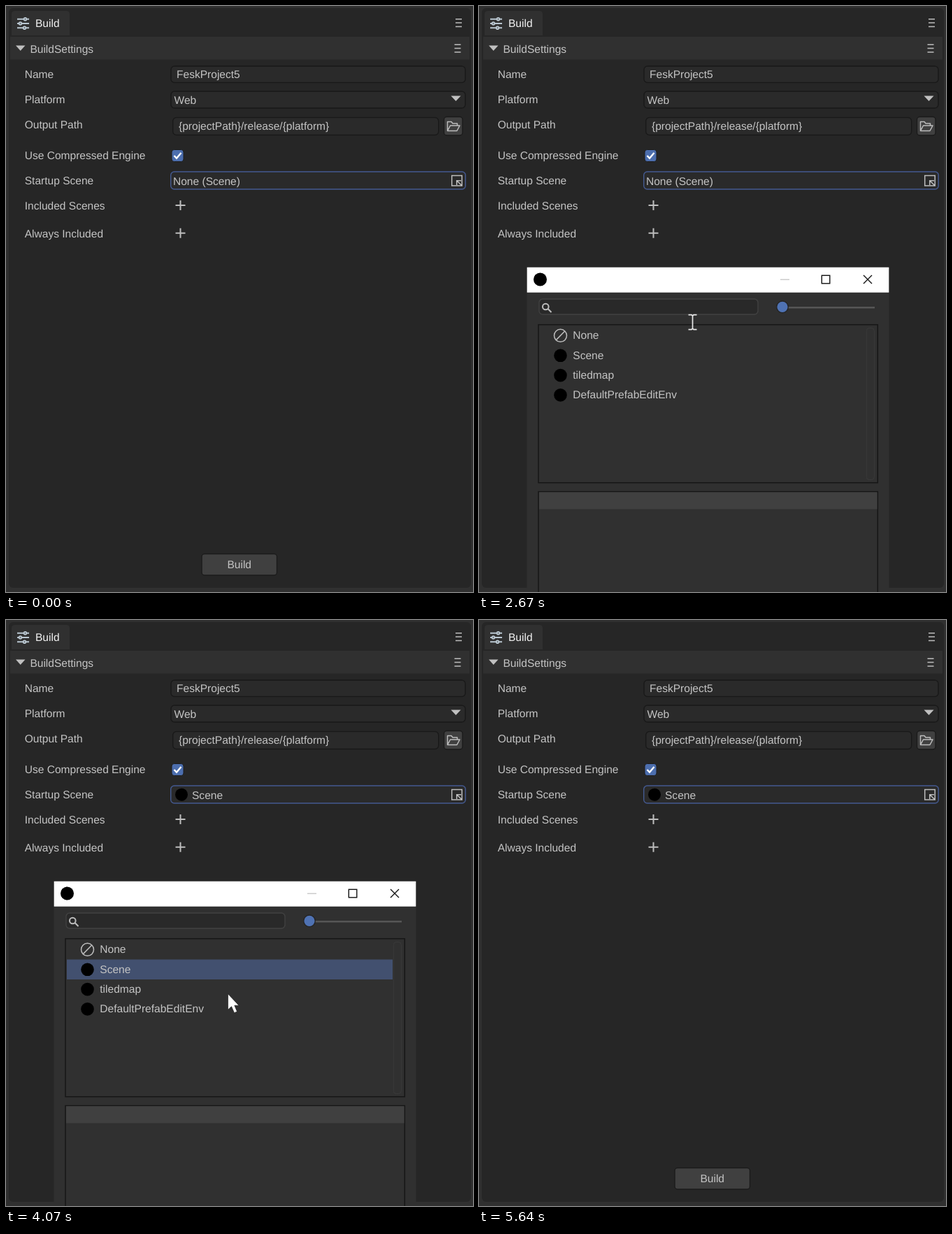
These frames come from a looping animation (668 by 838 pixels, 6520 ms). An HTML page:

```html
<!DOCTYPE html>
<html lang="en">
<head>
<meta charset="utf-8">
<title>Build settings</title>
<style>
  html, body { margin: 0; width: 100%; height: 100%; overflow: hidden; background: #303030; }
  svg { display: block; width: 668px; height: 838px; }
  text { font: 15.55px "Liberation Sans", Arial, sans-serif; fill: #c4c4c4; text-rendering: geometricPrecision; white-space: pre; }
  .field { fill: #2a2a2a; stroke: #191919; stroke-width: 1.4; }
  .focus { stroke: #445a91; }
  .search { fill: #292929; stroke: #414141; }
  .button { fill: #404040; stroke: #1b1b1b; stroke-width: 1.4; }
  .pane { fill: #303030; stroke: #161616; stroke-width: 1.5; }
  .line { fill: none; stroke: #bdbdbd; stroke-width: 1.5; }
  .bold { stroke-width: 2; }
  .solid { fill: #c0c0c0; }
  .bright { fill: #f2f2f2; }
</style>
</head>
<body>
<svg viewBox="0 0 668 838">
  <defs>
    <path id="menu" class="line" d="M0 0H9M0 5.4H9M0 10.8H9"/>
    <path id="plus" class="line bold" d="M-7 0H7M0 -7V7"/>
  </defs>
  <rect width="668" height="838" fill="#303030"/>
  <rect x="4" y="3" width="661" height="829" rx="6" fill="#262626"/>
  <path d="M8 42V12q0-5 5-5H86q5 0 5 5V42Z" fill="#303030"/>
  <rect x="6" y="44" width="657" height="32.5" fill="#303030"/>

  <g class="line bold" style="stroke:#b9c6d0">
    <path d="M16 18.7H33M16 25H33M16 31.2H33"/>
    <g fill="#303030"><circle cx="27.5" cy="18.7" r="1.8"/><circle cx="20.5" cy="25" r="1.8"/><circle cx="26.5" cy="31.2" r="1.8"/></g>
  </g>
  <text x="42" y="29.5" class="bright">Build</text>
  <use href="#menu" x="643" y="18.7"/>
  <use href="#menu" x="641.5" y="55.2"/>
  <path class="solid" d="M14 56.5H27.5L20.7 64Z"/>
  <text x="34.4" y="67">BuildSettings</text>
  <g id="labels"></g>

  <rect class="field" x="236" y="86" width="421" height="23.5" rx="5"/>
  <text x="244" y="103">FeskProject5</text>
  <rect class="field" x="236" y="122" width="421" height="24" rx="5"/>
  <text x="240.5" y="139.5">Web</text>
  <path class="solid" d="M636.5 128.5H650.5L643.5 136Z"/>
  <rect class="field" x="238.7" y="159.5" width="380" height="25" rx="5"/>
  <text x="247" y="177">{projectPath}/release/{platform}</text>
  <rect class="button" x="626.5" y="158.5" width="26.5" height="26.5" rx="4"/>
  <path class="line" stroke-linejoin="round" d="M631.5 178.5V165.5H637L639 168H645.5V171M631.5 178.5L635.5 171H649L645 178.5Z"/>
  <rect x="237" y="205.5" width="17" height="17" rx="3.5" fill="#4c6eae" stroke="#1d1d1d"/>
  <path d="M240.5 214L244 217.7L250.5 210" fill="none" stroke="#fff" stroke-width="2.4"/>

  <rect class="field focus" x="235.7" y="237" width="421.6" height="25" rx="5"/>
  <text id="empty" x="239" y="255.5">None (Scene)</text>
  <g id="chosen"><circle cx="251" cy="249.7" r="9" fill="#000"/><text x="266" y="255.5">Scene</text></g>
  <path class="line" d="M637.7 242.5H652.2V257H637.7ZM652.2 257L645 250M644.7 256V249.8H651"/>
  <use href="#plus" x="249.5" y="285"/>
  <use href="#plus" x="249.5" y="324.8"/>
  <rect class="button" x="280" y="783.5" width="107.5" height="30.5" rx="4"/>
  <text x="333.7" y="804" text-anchor="middle">Build</text>

  <g id="dialog">
    <rect id="frame" x="68.5" y="373.5" width="518" height="480" fill="#303030"/>
    <rect x="68.7" y="373.7" width="517.6" height="36" fill="#fff"/>
    <circle cx="87.5" cy="391" r="9.5" fill="#000"/>
    <g id="controls" fill="none" stroke="#111" stroke-width="1.4">
      <path d="M431 391.2H444" stroke="#c8c8c8"/>
      <rect x="490.3" y="385.3" width="11.5" height="11.5"/>
      <path d="M550 385L562 397M562 385L550 397"/>
    </g>
    <rect class="field search" x="86" y="419" width="313" height="22" rx="5"/>
    <circle class="line bold" cx="95.3" cy="430" r="4.3"/>
    <path class="line bold" d="M98.8 433.3L103.5 438"/>
    <path d="M434 431.3H566" stroke="#565656" stroke-width="2.4"/>
    <circle cx="434" cy="430.3" r="8.3" fill="#4f72b3" stroke="#252525" stroke-width="1.4"/>
    <rect class="pane" x="85" y="455.7" width="485.3" height="226"/>
    <rect x="554.3" y="460.5" width="11" height="217" rx="4" fill="none" stroke="#3a3a3a"/>
    <rect id="selected" x="87" y="485.5" width="466" height="28.5" fill="#42506f"/>
    <circle class="line" cx="116.5" cy="471.3" r="9"/>
    <path class="line" d="M110.3 477.6L122.7 465"/>
    <g id="scenes"></g>
    <rect class="pane" x="85" y="694.5" width="485.3" height="160"/>
    <rect x="86" y="695.3" width="483.5" height="24.2" fill="#404040"/>
  </g>

  <g id="pointer">
    <path id="arrow" d="M0 0V22.5L5 18L9 27L13 25.3L9.3 16.5H15.5Z" fill="#fff" stroke="#151515" stroke-width=".6"/>
    <path id="beam" d="M-6 -10.5H-1.5L0 -9L1.5 -10.5H6M0 -9V9M-6 10.5H-1.5L0 9L1.5 10.5H6" fill="none" stroke="#e8e8e8" stroke-width="1.7"/>
    <circle id="press" r="15.7" fill="#ff0" opacity=".54"/>
  </g>
</svg>
<script>
const LOOP = 6520;
const $ = id => document.getElementById(id);
const column = (names, x, top, step) =>
  names.map((name, i) => `<text x="${x}" y="${top + i * step}">${name}</text>`).join('');

$('labels').innerHTML =
  column(['Name', 'Platform', 'Output Path'], 26.7, 103, 36) +
  column(['Use Compressed Engine', 'Startup Scene', 'Included Scenes'], 26.7, 219, 36) +
  column(['Always Included'], 26.7, 330.5, 0);

const scenes = ['None', 'Scene', 'tiledmap', 'DefaultPrefabEditEnv'];
$('scenes').innerHTML = column(scenes, 134.3, 476.2, 28.3) + scenes.slice(1).map((_, i) =>
  `<circle cx="116.5" cy="${499.8 + i * 28.3}" r="9.3" fill="#000"/>`).join('');

// Places the pointer visits; it slows down on arrival
const stops = [
  { t: 450, x: 646, y: 324 },
  { t: 1070, x: 366, y: 250 },
  { t: 1770, x: 642, y: 249 },
  { t: 2180, x: 643, y: 249 },
  { t: 2670, x: 306, y: 452, ease: 1 },
  { t: 3160, x: 190.5, y: 503.5 },
  { t: 3380, x: 190.5, y: 503.5 },
  { t: 3580, x: 270, y: 523, ease: 1 },
  { t: 3850, x: 325, y: 565 },
  { t: 4610, x: 310, y: 504 },
  { t: 4740, x: 310, y: 504 },
  { t: 5640, x: 590, y: 860, ease: 1 }
];

function pointerAt(t) {
  const i = stops.findIndex(stop => stop.t > t);
  const a = stops[i - 1], b = stops[i];
  const k = 1 - (1 - (t - a.t) / (b.t - a.t)) ** (b.ease || 2);
  return [a.x + (b.x - a.x) * k, a.y + (b.y - a.y) * k];
}

const show = (id, on) => { $(id).style.display = on ? '' : 'none'; };

function draw(t) {
  const within = (from, to) => t >= from && t < to;
  const moving = within(450, 5640);
  const picked = t >= 3380;
  const closing = t >= 4740;
  const typing = within(2600, 2740);
  show('empty', !picked);
  show('chosen', picked);
  show('selected', picked);
  show('dialog', within(2250, 4810));
  show('controls', !closing);
  $('frame').setAttribute('stroke', closing ? '#3c3c3c' : 'none');
  show('press', within(1910, 2110) || within(3230, 3380));
  show('beam', typing);
  show('arrow', !typing);
  show('pointer', moving);
  if (moving) $('pointer').setAttribute('transform', `translate(${pointerAt(t)})`);
}

const begin = performance.now();
function frame() {
  draw((performance.now() - begin) % LOOP);
  requestAnimationFrame(frame);
}
frame();
</script>
</body>
</html>
```
